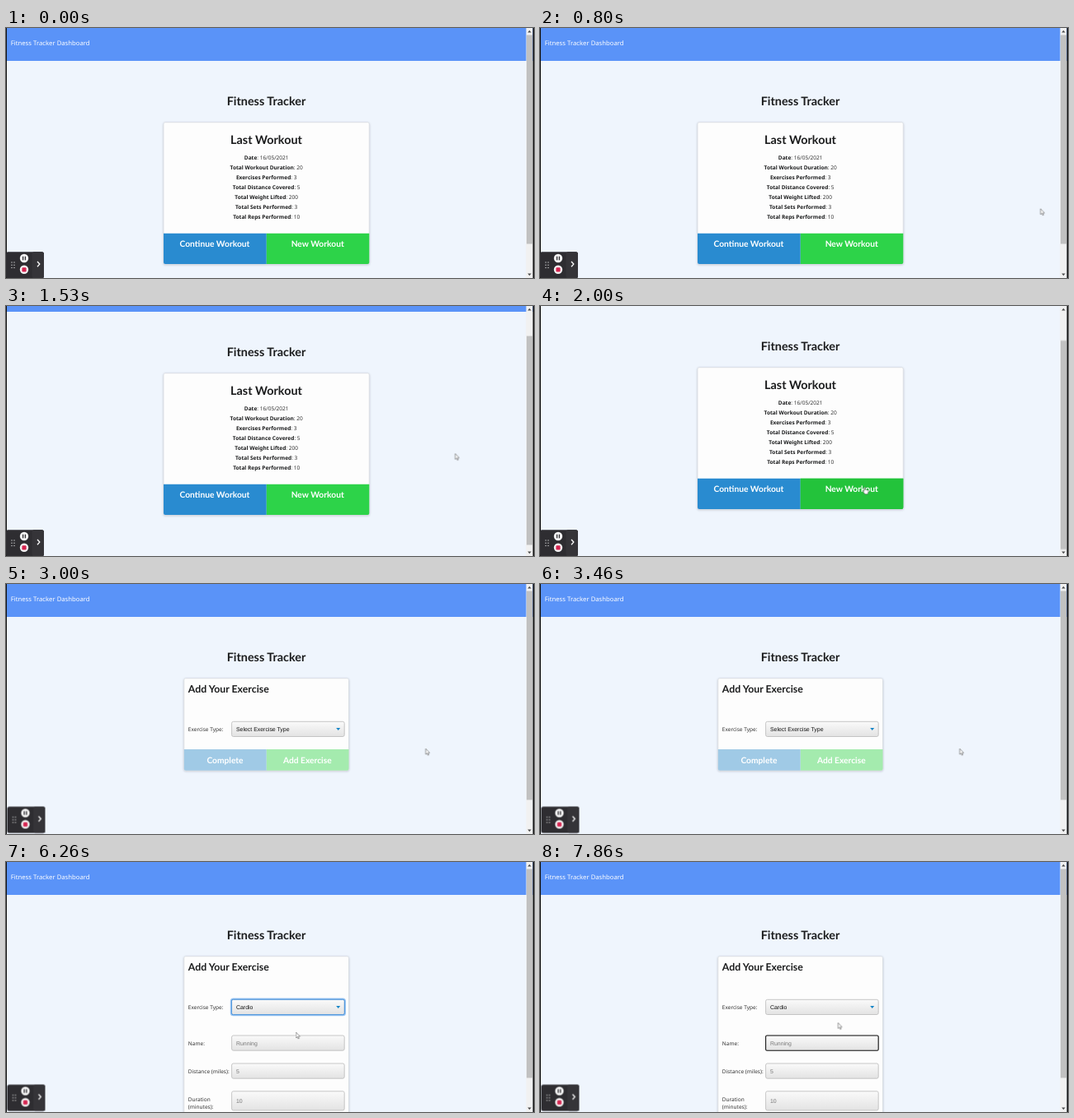
An HTML page for the animation above (8 s loop, 640 px wide and 304 px high).

```html
<!DOCTYPE html>
<html lang="en">
<head>
<meta charset="utf-8">
<title>Fitness Tracker</title>
<style>
html, body { margin: 0; width: 100%; height: 100%; overflow: hidden; background: #eff5fd; }
svg { display: block; width: 100vw; height: 100vh; text-rendering: geometricPrecision; }

.nav { font: 7.72px "Noto Sans", sans-serif; fill: #fff; }
.title { font: 700 14.4px Lato, sans-serif; fill: #1b1c1d; text-anchor: middle; }
.subtitle { font: 700 12.3px Lato, sans-serif; fill: #1b1c1d; }
.button { font: 700 10.25px Lato, sans-serif; fill: #fff; text-anchor: middle; }
.stats { font: 6.55px "Noto Sans", sans-serif; fill: #333; text-anchor: middle; }
.stats tspan { font-weight: 700; fill: #1b1c1d; }
.label { font: 6.5px "Noto Sans", sans-serif; fill: #333; }
.input { font: 6.93px "Liberation Sans", Arial, sans-serif; fill: #111; }
.hint { fill: #777; }
.field { fill: url(#fieldFill); stroke: #b9b9b9; stroke-width: .8; }
.card { fill: #fdfdfd; stroke: #d5d9de; stroke-width: .7; filter: url(#shadow); }

.step { animation: 8s step-end infinite; }
#summary { animation-name: showSummary; }
#form { animation-name: showForm; }
#summaryScroll { animation-name: scroll; }
#summaryThumb { animation-name: thumb; }
#hover, #hand { animation-name: hover; }
#selectRing { animation-name: selectFocus; }
#nameRing { animation-name: nameFocus; }
#choosing { animation-name: choosing; }
#chosen { animation-name: chosen; }
#toolbar { animation-name: toolbar; }
#arrow { animation-name: arrow; }
#beam { animation-name: beam; }
#cursor { animation: move 8s linear infinite; }

@keyframes showSummary { 0% { visibility: visible } 37.5%, 100% { visibility: hidden } }
@keyframes showForm { 0% { opacity: 0 } 37.5%, 100% { opacity: 1 } }
@keyframes scroll {
  0% { transform: translateY(0) } 17.5% { transform: translateY(-6px) }
  18.25% { transform: translateY(-20px) } 19.1% { transform: translateY(-33px) }
  20%, 100% { transform: translateY(-40px) }
}
@keyframes thumb {
  0% { transform: translateY(0) } 17.5% { transform: translateY(5px) }
  18.25% { transform: translateY(17px) } 19.1% { transform: translateY(28px) }
  20%, 100% { transform: translateY(33.5px) }
}
@keyframes hover { 0% { opacity: 0 } 23.5% { opacity: 1 } 29.2%, 100% { opacity: 0 } }
@keyframes selectFocus { 0% { opacity: 0 } 55% { opacity: 1 } 82.5%, 100% { opacity: 0 } }
@keyframes nameFocus { 0% { opacity: 0 } 82.5%, 100% { opacity: 1 } }
@keyframes choosing { 0% { opacity: 1 } 78.25%, 100% { opacity: 0 } }
@keyframes chosen { 0% { opacity: 0 } 78.25%, 100% { opacity: 1 } }
@keyframes toolbar { 0% { transform: none } 37.5%, 100% { transform: translate(1.5px, -1.5px) } }
@keyframes arrow {
  0% { opacity: 0 } 7.5% { opacity: 1 } 23.5% { opacity: 0 } 29.2% { opacity: 1 }
  80.6% { opacity: 0 } 84.2%, 100% { opacity: 1 }
}
@keyframes beam { 0% { opacity: 0 } 80.6% { opacity: 1 } 84.2%, 100% { opacity: 0 } }
@keyframes move {
  0%, 7.5% { transform: translate(638px, 240px) }
  15%, 19.5% { transform: translate(544.5px, 179.5px) }
  25%, 28.25% { transform: translate(392.5px, 220px) }
  32.5%, 44.1% { transform: translate(508.7px, 200.2px) }
  47.5%, 50% { transform: translate(428.5px, 190px) }
  57.5%, 78.24% { transform: translate(391.2px, 186px) }
  78.25%, 79.1% { transform: translate(351.5px, 207px) }
  82%, 83% { transform: translate(352px, 218px) }
  88.25%, 89.1% { transform: translate(359px, 203px) }
  91.6%, 95.75% { transform: translate(360.5px, 198px) }
  98.25%, 100% { transform: translate(361.3px, 195.5px) }
}
</style>
</head>
<body>
<svg viewBox="0 0 640 304" preserveAspectRatio="none">
  <defs>
    <linearGradient id="fieldFill" x2="0" y2="1">
      <stop stop-color="#fafafa"/><stop offset="1" stop-color="#e3e3e3"/>
    </linearGradient>
    <filter id="shadow" x="-5%" y="-5%" width="110%" height="112%">
      <feDropShadow dx="0" dy=".8" stdDeviation="1.2" flood-color="#445" flood-opacity=".3"/>
    </filter>
    <g id="pageTop">
      <rect width="640" height="40" fill="#5a93f8"/>
      <text class="nav" x="5.7" y="20.8">Fitness Tracker Dashboard</text>
      <text class="title" x="315.5" y="94">Fitness Tracker</text>
    </g>
    <rect id="thumb" x="631" y="8.5" width="7" height="254" fill="#c1c1c1"/>
    <path id="caret" d="M400.2 175h5l-2.5 2.9z" fill="#1585c7"/>
  </defs>

  <rect width="640" height="304" fill="#eff5fd"/>
  <rect x="630.5" width="8" height="304" fill="#f1f1f1"/>

  <g id="summary" class="step">
    <g id="summaryScroll" class="step">
      <use href="#pageTop"/>
      <rect class="card" x="191" y="114.7" width="249.3" height="172.3" rx="2"/>
      <text class="title" x="315.5" y="141.4">Last Workout</text>
      <g class="stats">
        <text x="315.7" y="159.7"><tspan>Date</tspan>: 16/05/2021</text>
        <text x="315.7" y="171.8"><tspan>Total Workout Duration</tspan>: 20</text>
        <text x="315.7" y="183.9"><tspan>Exercises Performed</tspan>: 3</text>
        <text x="315.7" y="196"><tspan>Total Distance Covered</tspan>: 5</text>
        <text x="315.7" y="208.2"><tspan>Total Weight Lifted</tspan>: 200</text>
        <text x="315.7" y="220.3"><tspan>Total Sets Performed</tspan>: 3</text>
        <text x="315.7" y="232.4"><tspan>Total Reps Performed</tspan>: 10</text>
      </g>
      <path d="M191 249.7h124.8V287H193a2 2 0 0 1-2-2z" fill="#298bd0"/>
      <path id="newButton" d="M315.8 249.7h124.5V285a2 2 0 0 1-2 2H315.8z" fill="#2dd349"/>
      <use id="hover" class="step" href="#hoverFill"/>
      <path id="hover" class="step" d="M315.8 249.7h124.5V285a2 2 0 0 1-2 2H315.8z" fill="#23c33b"/>
      <text class="button" x="253" y="266.1">Continue Workout</text>
      <text class="button" x="377.7" y="266.1">New Workout</text>
    </g>
    <rect x="630.5" width="8" height="304" fill="#f1f1f1"/>
    <use id="summaryThumb" class="step" href="#thumb"/>
  </g>

  <g id="form" class="step">
    <rect width="640" height="304" fill="#eff5fd"/>
    <use href="#pageTop"/>
    <g id="choosing" class="step">
      <rect class="card" x="215.8" y="114.7" width="199.7" height="112" rx="2"/>
      <path d="M215.8 201h100v25.7h-98a2 2 0 0 1-2-2z" fill="#a0cae6"/>
      <path d="M315.8 201h99.7v23.7a2 2 0 0 1-2 2h-97.7z" fill="#a4ebae"/>
      <text class="button" x="265.5" y="217.6">Complete</text>
      <text class="button" x="365.3" y="217.6">Add Exercise</text>
    </g>
    <g id="chosen" class="step">
      <rect class="card" x="215.8" y="114.7" width="199.7" height="220" rx="2"/>
      <g class="label">
        <text x="220.8" y="222.7">Name:</text>
        <text x="220.8" y="256.7">Distance (miles):</text>
        <text x="220.8" y="290.8">Duration</text>
        <text x="220.8" y="300.4">(minutes):</text>
      </g>
      <rect class="field" x="273.6" y="211" width="136.6" height="18.2" rx="2"/>
      <rect class="field" x="273.6" y="245" width="136.6" height="18.2" rx="2"/>
      <rect class="field" x="273.6" y="278.8" width="136.6" height="23.2" rx="2"/>
      <rect id="nameRing" class="step" x="273.6" y="211" width="136.6" height="18.2" rx="1.5" fill="none" stroke="#1c1c1c" stroke-width="1.1"/>
      <g class="input">
        <text class="hint" x="279" y="222.6">Running</text>
        <text class="hint" x="279" y="256.6">5</text>
        <text class="hint" x="279" y="292.9">10</text>
      </g>
    </g>
    <text class="subtitle" x="220.8" y="132">Add Your Exercise</text>
    <text class="label" x="220.8" y="179.2">Exercise Type:</text>
    <rect class="field" x="273.6" y="167.3" width="136.6" height="18.2" rx="2"/>
    <g id="selectRing" class="step" fill="none">
      <rect x="272.8" y="166.5" width="138.2" height="19.8" rx="2.6" stroke="#9cc6f3" stroke-width="2"/>
      <rect x="273.4" y="167.1" width="137" height="18.6" rx="2" stroke="#4a94dc" stroke-width="1"/>
    </g>
    <use href="#caret"/>
    <g class="input">
      <text id="choosing" class="step" x="279" y="178.7">Select Exercise Type</text>
      <text id="chosen" class="step" x="279" y="178.7">Cardio</text>
    </g>
    <rect x="630.5" width="8" height="304" fill="#f1f1f1"/>
    <use href="#thumb"/>
  </g>

  <path d="M632.3 5.4h4.4l-2.2-2.6zM632.3 298.6h4.4l-2.2 2.6z" fill="#505050"/>
  <path d="M0 0h1v304H0zM638.6 0H640v304h-1.4z" fill="#111"/>

  <g id="toolbar" class="step">
    <rect x="0" y="272.3" width="46" height="32" rx="2.5" fill="#2e2d31"/>
    <rect x="31.5" y="272.3" width="14.5" height="32" rx="2.5" fill="#353438"/>
    <path d="M7 285h0M10 285h0M7 288.3h0M10 288.3h0M7 291.6h0M10 291.6h0" stroke="#c4c4c6" stroke-width="1.5" stroke-linecap="round"/>
    <circle cx="22" cy="280" r="5.2" fill="#f4f4f4"/>
    <path d="M20.6 277.8v4.4M23.4 277.8v4.4" stroke="#2e2d31" stroke-width="1.3"/>
    <circle cx="22" cy="293.8" r="5.2" fill="#f4f4f4"/>
    <rect x="19.4" y="291.2" width="5.2" height="5.2" rx="1.2" fill="#d5234f"/>
    <path d="M38 284l2.8 3.1-2.8 3.1" fill="none" stroke="#fff" stroke-width="1.3"/>
  </g>

  <g id="cursor">
    <g fill="#fff" stroke="#555" stroke-width=".6" stroke-linejoin="round">
      <path id="arrow" class="step" d="M0 0v7l1.6-1.4 1.1 2.4 1.1-.5-1.1-2.3h2.1z"/>
      <path id="hand" class="step" d="M.4.7q.7-.8 1.3 0v2.6l3.1.7q.8.3.7 1.2l-.7 3.6H1.4L-1 5.6q0-1 .9-.7l.5.4z"/>
    </g>
    <path id="beam" class="step" d="M-1.3-3.8h2.6M0-3.8v7.6M-1.3 3.8h2.6" stroke="#333" stroke-width=".7" fill="none"/>
  </g>
</svg>
</body>
</html>
```
